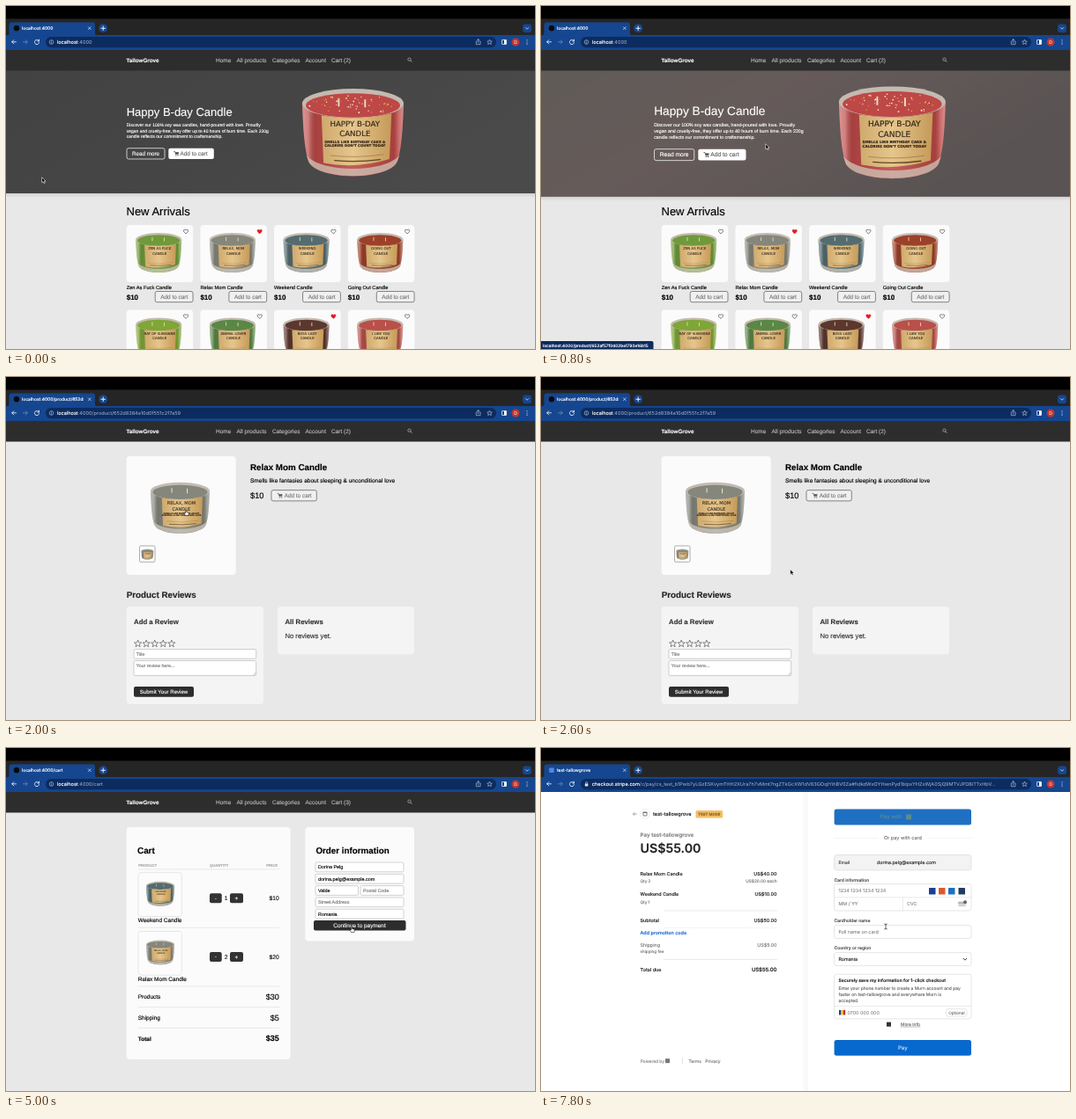
These frames come from a looping animation (600 px wide and 390 px high, 8000 ms). An HTML page:

```html
<!DOCTYPE html>
<html lang="en">
<head>
<meta charset="utf-8">
<title>Candle shop walkthrough</title>
<style>
@property --zoom { syntax: "<number>"; inherits: false; initial-value: 1; }
html, body { margin: 0; width: 100%; height: 100%; overflow: hidden; background: #000; }
svg { display: block; width: 100vw; height: 100vh; font-family: "Liberation Sans", Arial, sans-serif; text-rendering: geometricPrecision; }
text { stroke-width: .14px; }
.ui { font-family: Inter, Roboto, sans-serif; }
.label { font-family: "DejaVu Sans", Verdana, sans-serif; }
.b { font-weight: 700; }
.sb { font-weight: 600; }
.m { font-weight: 500; }
.mid { text-anchor: middle; }
.end { text-anchor: end; }
.line { fill: none; stroke-linecap: round; stroke-linejoin: round; }
/* Zooming through a property keeps the text sharp */
.hero { transform-origin: 300px 143px; transform: scale(var(--zoom)); animation: grow 8s infinite; }
.warm { animation: warm 8s infinite; }
.wallet { animation: wallet 8s infinite; }
.cursor { animation: move 8s infinite; }
@keyframes grow {
  0%, 2.5% { --zoom: 1; animation-timing-function: steps(3); }
  10%, 12.5% { --zoom: 1.052; animation-timing-function: steps(2); }
  17.5%, 100% { --zoom: 1; }
}
@keyframes warm {
  0%, 2.5% { opacity: 0; animation-timing-function: steps(3); }
  10%, 12.5% { opacity: 1; animation-timing-function: steps(2); }
  17.5%, 100% { opacity: 0; }
}
@keyframes wallet {
  0%, 90% { opacity: 0; animation-timing-function: steps(3); }
  97.5%, 100% { opacity: 1; }
}
</style>
</head>
<body>
<script>
const LOOP = 8000, FRAME = 200;
const pct = ms => ms / LOOP * 100 + '%';
let css = '', timers = 0;

// Drawing helpers
const text = (x, y, size, str, fill = '#000', cls = '') =>
  `<text x="${x}" y="${y}" font-size="${size}" fill="${fill}" stroke="${fill}" class="${cls}">${str}</text>`;
const rect = (x, y, w, h, fill, r = 0, stroke = 'none') =>
  `<rect x="${x}" y="${y}" width="${w}" height="${h}" rx="${r}" fill="${fill}" stroke="${stroke}" stroke-width=".7"/>`;
const dot = (x, y, r, fill) => `<circle cx="${x}" cy="${y}" r="${r}" fill="${fill}"/>`;
const line = (d, stroke, w = .7) => `<path class="line" d="${d}" stroke="${stroke}" stroke-width="${w}"/>`;
const rule = (x1, x2, y, stroke = '#dcdcdc') => line(`M${x1} ${y}H${x2}`, stroke, .6);
const at = (x, y, body) => `<g transform="translate(${x} ${y})">${body}</g>`;

// Shows a group only during the given [from, to] spans
function during(spans, body) {
  const name = 'on' + timers++;
  css += `@keyframes ${name}{0%{opacity:0}` +
    spans.map(([a, b]) => `${pct(a)}{opacity:1}${pct(b)}{opacity:0}`).join('') + '}';
  return `<g style="animation:${name} 8s step-end infinite">${body}</g>`;
}

function random(seed) {
  return () => (seed = (seed * 16807) % 2147483647) / 2147483647;
}

function candle(x, y, w, wax, lines, fine = [], extra = '') {
  const ink = '#33261a', body = 'M0 15C1 42 2 58 6 72C14 92 86 92 94 72C98 58 99 42 100 15Z';
  const rows = lines.map((s, i) => text(52, 38 + i * 9.8, 7.5, s, ink, 'label mid')).join('');
  const small = fine.map((s, i) => text(52, 54 + i * 4, 3.4, s, ink, 'label b mid')).join('');
  return `<g transform="translate(${x} ${y}) scale(${w / 100})">
    <path d="${body}" fill="${wax}"/><path d="${body}" fill="url(#glass)"/>
    <path d="M4 66C18 84 82 84 96 66L93 74C82 91 18 91 7 74Z" fill="#cfc6b8" opacity=".75"/>
    <ellipse cx="50" cy="15" rx="50" ry="14.5" fill="#c4bab0"/>
    <ellipse cx="50" cy="17" rx="46.5" ry="12" fill="${wax}"/>
    <path d="M36 18V10M62 19V11" stroke="#e9dfc4" stroke-width="1.6"/>${extra}
    <path d="M19 27Q54 33 88 25L86 70Q54 80 21 74Z" fill="url(#paper)"/>${rows}${small}
    ${line('M28 66.5Q54 69.5 80 65.5', '#8a693f', .5)}${line('M32 71.5Q54 73.5 77 70.5', '#5f4627', 1.1)}</g>`;
}

const cartIcon = (x, y, c) => at(x, y, line('M0 0H1.1L2 3.4H5', c, .7) +
  `<path d="M1.4.8H5.7L5 2.8H2Z" fill="${c}"/>` + dot(2.3, 4.6, .6, c) + dot(4.6, 4.6, .6, c));
const heart = (x, y, on) => at(x, y,
  `<path d="M0 2.5C-4.4-.4-2.3-3.4 0-1.4C2.3-3.4 4.4-.4 0 2.5Z" fill="${on ? '#e01b24' : 'none'}" stroke="${on ? '#e01b24' : '#222'}" stroke-width=".6"/>`);
function star(x, y) {
  const pts = Array.from({ length: 10 }, (_, i) => {
    const r = i % 2 ? 1.8 : 4.3, a = i * Math.PI / 5;
    return (x + r * Math.sin(a)).toFixed(2) + ',' + (y - r * Math.cos(a)).toFixed(2);
  });
  return `<polygon points="${pts.join(' ')}" fill="none" stroke="#444" stroke-width=".6"/>`;
}

// Shop pages
function shopNav() {
  const links = [[238, 'Home'], [261.5, 'All products'], [302, 'Categories'], [339.5, 'Account']];
  const count = n => text(369, 64, 6.5, `Cart (${n})`, '#b9b9b9');
  return rect(0, 50, 600, 23.5, '#2d2d2d') + text(136.5, 64, 6.25, 'TallowGrove', '#fff', 'b') +
    links.map(([x, s]) => text(x, 64, 6.5, s, '#b9b9b9')).join('') +
    during([[0, 3200]], count(2)) + during([[3200, LOOP]], count(3)) +
    `<circle cx="457.5" cy="60.7" r="1.7" fill="none" stroke="#ccc" stroke-width=".6"/>` +
    line('M458.8 62L460.2 63.4', '#ccc');
}

function hero() {
  const rnd = random(77), colors = ['#f4e3a1', '#f2b8b5', '#fff4d6', '#d9a441'];
  let bits = '';
  for (let i = 0; i < 55; i++) {
    const a = rnd() * 6.28, r = Math.sqrt(rnd());
    bits += dot((50 + 43 * r * Math.cos(a)).toFixed(1), (17 + 10.5 * r * Math.sin(a)).toFixed(1), .4 + rnd() * .4, colors[i % 4]);
  }
  const copy = ['Discover our 100% soy wax candles, hand-poured with love. Proudly',
    'vegan and cruelty-free, they offer up to 40 hours of burn time. Each 220g',
    'candle reflects our commitment to craftsmanship.'];
  return `<g class="hero">` + rect(0, 213, 600, 5, 'url(#shade)') + rect(0, 73, 600, 140, 'url(#dark)') +
    `<g class="warm">${rect(0, 73, 600, 140, 'url(#rosy)')}</g>` +
    text(136.7, 124.6, 13, 'Happy B-day Candle', '#fff') +
    copy.map((s, i) => text(136.7, 137 + i * 6.6, 5, s, '#fff')).join('') +
    rect(137, 161.7, 43, 12.3, 'none', 2, '#fff') + text(158.5, 170, 6.3, 'Read more', '#fff', 'mid') +
    rect(184.3, 161.7, 51.5, 12.3, '#fff', 2) + cartIcon(190.5, 165.4, '#444') + text(197.5, 170, 6.4, 'Add to cart', '#666') +
    candle(336, 93.5, 115, '#bd4846', ['HAPPY B-DAY', 'CANDLE'],
      ['SMELLS LIKE BIRTHDAY CAKE &amp;', "CALORIES DON'T COUNT TODAY"], bits) + '</g>';
}

const goods = [
  ['Zen As Fuck Candle', '#6f9a3a', ['ZEN AS FUCK', 'CANDLE']],
  ['Relax Mom Candle', '#85867c', ['RELAX, MOM', 'CANDLE'], 1],
  ['Weekend Candle', '#546c70', ['WEEKEND', 'CANDLE']],
  ['Going Out Candle', '#9c4029', ['GOING OUT', 'CANDLE']],
  ['Ray Of Sunshine Candle', '#7fa636', ['RAY OF SUNSHINE', 'CANDLE']],
  ['Animal Lover Candle', '#5a8746', ['ANIMAL LOVER', 'CANDLE']],
  ['Boss Lady Candle', '#5c372e', ['BOSS LADY', 'CANDLE'], 1],
  ['I Like You Candle', '#b9504a', ['I LIKE YOU', 'CANDLE']]
];
const RELAX = goods[1], WEEKEND = goods[2];

function goodsCard([name, wax, lines, liked], i) {
  return at(136.7 + i % 4 * 83.7, 249 + (i >> 2) * 96.5,
    rect(0, 0, 75.5, 65, '#fbfbfb', 4) + candle(10.5, 8.7, 52, wax, lines) + heart(67.3, 7.3, liked) +
    text(0, 73.3, 5.7, name) + text(0, 85, 8, '$10', '#000', 'b') +
    rect(32.5, 75.5, 42.8, 12.2, '#f0f0f0', 2, '#555') + text(54, 84, 6.4, 'Add to cart', '#777', 'mid'));
}

const home = () => rect(0, 50, 600, 340, '#e8e8e8') + hero() +
  text(136.5, 238, 13, 'New Arrivals') + goods.map(goodsCard).join('');

function product() {
  const fine = ['SMELLS LIKE FANTASIES ABOUT', 'SLEEPING &amp; UNCONDITIONAL LOVE'];
  return rect(0, 50, 600, 340, '#e8e8e8') + rect(136.7, 90, 124, 135, '#fbfbfb', 4) +
    candle(164, 119.5, 67, RELAX[1], RELAX[2], fine) +
    rect(151.5, 192, 17.5, 18.3, '#fff', 1.5, '#888') + candle(153.3, 195.5, 14, RELAX[1], RELAX[2]) +
    text(277, 105.5, 9.8, 'Relax Mom Candle', '#000', 'b') +
    text(277, 120.2, 6.55, 'Smells like fantasies about sleeping &amp; unconditional love') +
    text(277, 138, 9.3, '$10') + rect(301, 128.7, 51.3, 12.2, '#f0f0f0', 2, '#555') +
    cartIcon(308, 132.4, '#555') + text(315.7, 137, 6.4, 'Add to cart', '#777') +
    text(136.7, 250.5, 9.8, 'Product Reviews', '#222', 'b') +
    rect(136.7, 261, 155.3, 111, '#f4f4f4', 4) + text(145, 280.7, 7.8, 'Add a Review', '#333', 'b') +
    [0, 1, 2, 3, 4].map(i => star(149.6 + i * 9.55, 303.3)).join('') +
    rect(145, 309.6, 138.7, 10.6, '#fff', 1.5, '#bbb') + text(147.7, 317, 5.2, 'Title', '#777') +
    rect(145, 322.6, 138.7, 17, '#fff', 1.5, '#bbb') + text(147.7, 330, 5.25, 'Your review here...', '#777') +
    line('M280.5 338.7L283 336.2M282 338.8L283 337.8', '#888', .4) +
    rect(145, 352, 68, 11.7, '#2d2d2d', 2) + text(179, 360, 6.1, 'Submit Your Review', '#fff', 'mid') +
    rect(308, 261, 155, 54.3, '#f4f4f4', 4) + text(316.4, 280.7, 7.8, 'All Reviews', '#333', 'b') +
    text(316.4, 297.3, 7.7, 'No reviews yet.', '#333');
}

function cartRow([name, wax, lines], y, count, price) {
  return at(0, y, rect(150, 0, 49.3, 49.8, '#fcfcfc', 3, '#dedede') + candle(159, 10, 32, wax, lines) +
    text(149.7, 56.3, 6.5, name) + rect(231, 23.5, 13.7, 11, '#333', 2) + text(237.8, 31, 6.5, '-', '#fff', 'mid') +
    text(249.5, 31.3, 6.7, count, '#111', 'mid') + rect(254, 23.5, 15, 11, '#333', 2) +
    text(261.5, 31.3, 6.5, '+', '#fff', 'mid') + text(309.7, 31.3, 6.7, price, '#111', 'end'));
}

function cart() {
  const heads = [[150.3, 'PRODUCT'], [231, 'QUANTITY'], [295.3, 'PRICE']];
  const sums = [[285, 'Products', '$30', ''], [309, 'Shipping', '$5', ''], [332.6, 'Total', '$35', 'b ']];
  const fields = [[351, 130, 100, 'Dorina Pelg', 1], [351, 143.3, 100, 'dorina.pelg@example.com', 1],
    [351, 156.6, 48.5, 'Valde', 1], [402, 156.6, 49, 'Postal Code', 0],
    [351, 169.9, 100, 'Street Address', 0], [351, 183.2, 100, 'Romania', 1]];
  const pay = (x, y, w, h, s) => rect(x, y, w, h, '#2d2d2d', 2) + text(401, 204, s, 'Continue to payment', '#fff', 'mid');
  return rect(0, 50, 600, 340, '#e8e8e8') + rect(136.7, 90, 186, 264, '#fbfbfb', 4) +
    text(149, 119.5, 9.9, 'Cart', '#000', 'b') +
    heads.map(([x, s]) => text(x, 135, 4.2, s, '#aaa', 'b')).join('') +
    [138, 204.3, 271, 294.6, 318.3].map(y => rule(150, 309.7, y)).join('') +
    cartRow(WEEKEND, 141.7, 1, '$10') + cartRow(RELAX, 208.4, 2, '$20') +
    sums.map(([y, s, p, c]) => text(149.7, y, 6.5, s, '#000', c) + text(309.7, y + .8, 9, p, '#000', c + 'end')).join('') +
    rect(339.3, 90, 123.7, 129.5, '#fbfbfb', 4) + text(351.4, 119.5, 9.8, 'Order information', '#000', 'b') +
    fields.map(([x, y, w, s, on]) => rect(x, y, w, 10.8, '#fff', 1.5, '#bdbdbd') + text(x + 3, y + 7.4, 5.4, s, on ? '#000' : '#777')).join('') +
    during([[3600, 4600]], pay(351, 196.5, 100, 10.8, 6.2)) + during([[4600, 6200]], pay(349, 196, 104.5, 11.5, 6.45));
}

// Payment pages
const split = () => rect(0, 50, 600, 340, '#fff') + rect(295, 50, 8, 340, 'url(#fold)');
const powered = y => text(112.7, y, 4.9, 'Powered by', '#888') + rect(141, y - 4.4, 5, 5, '#777');
const backArrow = (x, y, c) => line(`M${x + 4} ${y}H${x}M${x + 1.6} ${y - 1.6}L${x} ${y}L${x + 1.6} ${y + 1.6}`, c, .6);

function skeleton() {
  const bars = [[113, 143, 34, 7, 3.5], [113, 155.5, 50, 10, 4.5], [113, 179, 17, 17, 3], [135, 179, 113.5, 4.6, 1],
    [135, 190.8, 113.5, 4.6, 1], [113, 205.5, 17, 17, 3], [135, 205.7, 113.5, 4.6, 1], [135, 217.7, 113.5, 4.6, 1]];
  const blocks = [[118.5, 10.5, 64], [145, 15.5, 154], [176, 30, 154], [222, 14.5, 154], [252, 30, 154], [294.5, 17.3, 154]];
  return `<g class="ui">` + split() + rect(0, 50, 600, 340, '#fafafa88') + backArrow(105, 124, '#aaa') + dot(119, 124, 5.6, '#ededed') +
    bars.map(([x, y, w, h, r]) => rect(x, y, w, h, '#ededed', r)).join('') +
    blocks.map(([y, h, w], i) => rect(338.3, y, w, h, 'url(#bone)', i ? 1.5 : 5)).join('') + powered(322) + '</g>';
}

function checkout() {
  const L = 112.6, R = 267.5, G = '#777', D = '#222';
  const row = (y, s, p, c = D, w = 'm ') => text(L, y, 5.4, s, c, w) + text(R, y, 5.4, p, c, w + 'end');
  const left = backArrow(104.5, 75, '#777') + `<circle cx="118" cy="75" r="5.3" fill="#fff" stroke="#e4e4e4" stroke-width=".7"/>` +
    rect(116, 73.2, 4, 3.8, '#fff', .5, '#444') + line('M115.8 73.2H120.2', '#444') +
    text(127, 77, 5.6, 'test-tallowgrove', D, 'm') + rect(175.5, 71, 30.7, 8.4, '#f2bf66', 1.5) +
    text(190.9, 76.8, 4.3, 'TEST MODE', '#8a5a18', 'sb mid') + text(L, 100.5, 6.2, 'Pay test-tallowgrove', G, 'm') +
    text(L, 118.6, 14.2, 'US$55.00', D, 'sb') + row(144.5, 'Relax Mom Candle', 'US$40.00') +
    text(L, 153, 4.6, 'Qty 2', G) + text(R, 153, 4.8, 'US$20.00 each', G, 'end') +
    row(168.4, 'Weekend Candle', 'US$10.00') + text(L, 177, 4.6, 'Qty 1', G) + rule(139.5, R, 185) +
    row(197.8, 'Subtotal', 'US$50.00') + rule(139.5, R, 204.5, '#eee') +
    text(L, 211.6, 5.4, 'Add promotion code', '#0a5bd0', 'm') + row(225.6, 'Shipping', 'US$5.00', G, '') +
    text(L, 232.6, 4.6, 'shipping fee', G) + rule(139.5, R, 240.5) +
    text(L, 253.6, 5.4, 'Total due', D, 'm') + text(R, 253.6, 5.9, 'US$55.00', D, 'sb end') +
    powered(357.6) + line('M160.5 352.5V359', '#ccc', .6) + text(167.5, 357.6, 4.9, 'Terms', G) + text(186.3, 357.6, 4.9, 'Privacy', G);

  const X = 337.5, H = '#888', E = '#dcdcdc';
  const box = (y, h, fill = '#fff') => rect(332.6, y, 155.4, h, fill, 2.5, E);
  const label = (y, s) => text(332.6, y, 4.95, s, '#444', 'm');
  const marks = [[440, '#1d3f94'], [451, '#db5a2b'], [462, '#1b6fc5'], [473.5, '#243b5e']];
  const about = ['Enter your phone number to create a Murn account and pay',
    'faster on test-tallowgrove and everywhere Murn is', 'accepted.'];
  const right = `<g class="wallet">` + rect(332.6, 69.5, 155.4, 18, '#1f6fc2', 2.5) +
    text(385, 80.3, 6, 'Pay with', '#5d8a8c', 'm') + rect(414, 75.5, 6, 6, '#5d8a8c') + '</g>' +
    rule(332.6, 382, 102.5, '#eee') + rule(439, 488, 102.5, '#eee') + text(410.5, 104.4, 5.5, 'Or pay with card', '#777', 'mid') +
    box(121.6, 17.3, '#f3f3f3') + text(X, 132.2, 5, 'Email', '#555', 'm') + text(381, 132.2, 5.3, 'dorina.pelg@example.com', D) +
    label(151.5, 'Card information') + box(154.6, 30.4) + rule(332.6, 488, 169.9, E) + line('M410.3 170V185', E, .6) +
    text(X, 164.3, 5.4, '1234 1234 1234 1234', H) + text(X, 179.4, 5.4, 'MM / YY', H) + text(415, 179.4, 5.4, 'CVC', H) +
    marks.map(([x, c]) => rect(x, 159, 7.5, 7.5, c, .6)).join('') +
    rect(473.3, 174.5, 8.5, 5.8, '#d4d4d4', .8) + rule(473.3, 481.8, 176, '#777') + dot(481, 175.3, 2, '#666') +
    label(197.7, 'Cardholder name') + box(201.5, 15) + text(X, 211, 5.4, 'Full name on card', H) +
    label(229, 'Country or region') + box(232.6, 15) + text(X, 242.1, 5.3, 'Romania', D) + line('M479 239.3L480.9 241.2L482.8 239.3', '#222', .9) +
    box(257.2, 50.7) + text(X, 266.3, 5.05, 'Securely save my information for 1-click checkout', D, 'sb') +
    about.map((s, i) => text(X, 274.5 + i * 7.2, 4.9, s, '#666')).join('') + rule(332.6, 488, 293.6, E) +
    rect(338, 298, 2.4, 5.5, '#223b85') + rect(340.4, 298, 2.4, 5.5, '#f0c52e') + rect(342.8, 298, 2.4, 5.5, '#c9302c') +
    text(347.4, 303, 5.4, '0700 000 000', H) + rect(459.7, 296.7, 23.3, 8.3, '#fff', 1.5, E) + text(471.4, 302.6, 4.7, 'Optional', '#777', 'mid') +
    rect(392, 311.7, 5, 5, '#333') + text(408, 316, 4.9, 'More info', '#666') + rule(408, 430, 317, '#888') +
    rect(332.6, 332, 155.4, 17.8, '#0768ce', 2.5) + text(410.3, 343.2, 6, 'Pay', '#bfdaf5', 'm mid');
  return `<g class="ui">${split()}${left}${right}</g>`;
}

// Browser frame
function browser() {
  const tab = (from, to, s, icon) => during([[from, to]], icon + text(18, 27.3, 4.9, s, '#fff', 'm'));
  const url = (from, to, host, path) => during([[from, to]],
    text(57.8, 43.1, 5.6, `${host}<tspan fill="#a5b9d8" stroke="none">${path}</tspan>`, '#fff'));
  const shopIcon = dot(12, 25.3, 3.2, '#0a0a0a');
  const ring = `<circle cx="12" cy="25.3" r="2.6" fill="none" stroke="#8fa9d2" stroke-width=".8" stroke-dasharray="12 5"/>`;
  const item = 'localhost:4000/product/652d8384';
  const payPath = '/c/pay/cs_test_b1Pwb7yLGzESKvymTHH2XUra7h7vMmt7ngZTkGcXW1dV83GOqtYihBV0Za#fidkdWxOYHwnPyd1blpxYHZxWjA0SjQ9MTVJPDBiTTxHbV...';
  const reload = line('M37.2 39.6A2.6 2.6 0 1 0 37.6 41.6M37.5 38.2V40H35.7', '#fff', .8);
  const stop = line('M33 38.8L37 42.8M37 38.8L33 42.8', '#fff', .9);
  const info = `<circle cx="51.5" cy="41" r="2.3" fill="none" stroke="#c5d3ea" stroke-width=".6"/>` + line('M51.5 41V42.2M51.5 39.8V39.9', '#c5d3ea', .6);
  const lock = rect(49.8, 40.5, 3.6, 2.9, '#d5e0f2', .4) + line('M50.5 40.5V39.7A1.1 1.1 0 0 1 52.7 39.7V40.5', '#d5e0f2', .6);
  return `<g class="ui">` + rect(0, 0, 600, 14.5, '#000') + rect(0, 14.5, 600, 19, '#252525') + rect(0, 33, 600, 17, '#15468f') +
    `<path d="M1 33.5Q3.5 33.5 3.5 30.5V21.5Q3.5 18.5 6.5 18.5H98Q101 18.5 101 21.5V30.5Q101 33.5 103.5 33.5Z" fill="#15468f"/>` +
    `<clipPath id="tabText"><path d="M0 18H88V33H0Z"/></clipPath><g clip-path="url(#tabText)">` +
    tab(0, 1600, 'localhost:4000', shopIcon) + tab(1600, 3600, item, shopIcon) +
    tab(3600, 5200, 'localhost:4000/cart', shopIcon) + tab(5200, 6200, 'localhost:4000/cart', ring) +
    tab(6200, 6800, 'Quovel Checkout', ring) + tab(6800, LOOP, 'test-tallowgrove', rect(9.2, 22.5, 5.6, 5.6, '#4f86e8', .8)) + '</g>' +
    line('M93.3 23.8L96.3 26.8M96.3 23.8L93.3 26.8', '#dfe8f7', .7) + dot(110.2, 25.3, 5, '#15468f') +
    line('M107.9 25.3H112.5M110.2 23V27.6', '#fff', .9) +
    rect(586, 20.5, 10, 9.8, '#15468f', 3) + line('M589.3 24.6L591 26.3L592.7 24.6', '#dfe8f7', .8) +
    line('M11.5 40.8H6.8M8.8 38.7L6.7 40.8L8.8 42.9', '#fff', .8) + line('M19.5 40.8H24.2M22.2 38.7L24.3 40.8L22.2 42.9', '#6d8dbf', .8) +
    during([[0, 5200], [7400, LOOP]], reload) + during([[5200, 7400]], stop) +
    rect(45, 35, 511, 12.2, '#0c2b5f', 6.1) + during([[0, 6200]], info) + during([[6200, LOOP]], lock) +
    url(0, 1600, 'localhost', ':4000') + url(1600, 3600, 'localhost', ':4000/product/652d8384e10d0f551c2f7a59') +
    url(3600, 6200, 'localhost', ':4000/cart') + url(6200, LOOP, 'checkout.stripe.com', payPath) +
    rect(526, 36, 16, 10, '#0c2b5f') +
    line('M534 40H533.3V43.7H538V40H537.3M535.65 42V37.8M534.4 39L535.65 37.7L536.9 39', '#c5d3ea', .6) +
    `<path transform="translate(548.5 41)" d="M0-2.8L.8-.9 2.8-.8 1.3.6 1.8 2.6 0 1.5-1.8 2.6-1.3.6-2.8-.8-.8-.9Z" fill="none" stroke="#c5d3ea" stroke-width=".6"/>` +
    rect(562.5, 38.5, 5, 5, 'none', .5, '#fff') + rect(565, 38.5, 2.5, 5, '#fff') +
    dot(578, 41, 4.5, '#c0362f') + text(578, 43, 5, 'D', '#f5d5d2', 'mid') +
    [38.8, 41, 43.2].map(y => dot(591, y, .6, '#dfe8f7')).join('') + '</g>';
}

function statusBar() {
  const note = (from, to, w, s) => during([[from, to]],
    `<g class="ui">${rect(-3, 381, w + 3, 12, '#0c2b5f', 2)}${text(2, 387.6, 4.75, s, '#fff', 'm')}</g>`);
  return note(600, 1200, 127.5, 'localhost:4000/product/652af57f0d02be1793e16b15') +
    note(1400, 1600, 127.5, 'localhost:4000/product/652d8384e10d0f551c2f7a59') +
    note(3400, 3600, 52, 'localhost:4000/cart') + note(5200, 6800, 200, 'Waiting for localhost...') +
    note(6800, 7400, 200, 'Waiting for checkout.stripe.com...');
}

function cursor() {
  const path = [[0, 41, 195], [800, 255, 157], [1400, 258, 285], [2000, 204, 151], [2600, 283, 219],
    [3000, 327, 135], [3400, 380, 62], [4800, 392, 203], [6400, 392, 203], [7800, 391, 203], [LOOP, 391, 203]];
  css += '@keyframes move{' + path.map(([ms, x, y], i) => {
    const steps = i + 1 < path.length ? (path[i + 1][0] - ms) / FRAME : 1;
    return `${pct(ms)}{transform:translate(${x}px,${y}px);animation-timing-function:steps(${steps})}`;
  }).join('') + '}';
  const arrow = `<path d="M-.3-.2V5.7L1.1 4.5 2.1 6.6 3.2 6.1 2.3 4.1H4.1Z" fill="#000" stroke="#fff" stroke-width=".6"/>`;
  const hand = `<path d="M-.6.6Q0-.4.6.6V2.6L3 3.2Q3.6 3.5 3.3 4.6L2.8 6.6H-.5L-2.2 4.1Q-2 3.3-.6 4.1Z" fill="#fff" stroke="#000" stroke-width=".55"/>`;
  const beam = line('M-1.3-3Q0-3 0-2Q0-3 1.3-3M0-2V2M-1.3 3Q0 3 0 2Q0 3 1.3 3', '#222', .7);
  return `<g class="cursor">` +
    during([[0, 1400], [1600, 1800], [2400, 2800], [3200, 3400], [3600, 4600], [6200, 6800]], arrow) +
    during([[1400, 1600], [1800, 2400], [2800, 3200], [3400, 3600], [4600, 6200]], hand) +
    during([[6800, LOOP]], beam) + '</g>';
}

const gradient = (id, stops, box = 'x2="1"') => `<linearGradient id="${id}" ${box}>` +
  stops.map(([o, c, a = 1]) => `<stop offset="${o}" stop-color="${c}" stop-opacity="${a}"/>`).join('') + '</linearGradient>';
const defs = '<defs>' +
  gradient('dark', [[0, '#424242'], [.5, '#454545'], [1, '#4a4a4a']], 'x2="1" y2=".4"') +
  gradient('rosy', [[0, '#605c58'], [.45, '#665b5a'], [1, '#595353']], 'x2="1" y2=".4"') +
  gradient('shade', [[0, '#000', .1], [1, '#000', 0]], 'x2="0" y2="1"') +
  gradient('glass', [[0, '#fff', .42], [.06, '#fff', .3], [.13, '#000', .12], [.5, '#fff', .12], [.9, '#000', .12], [.95, '#fff', .2], [1, '#fff', .4]]) +
  gradient('paper', [[0, '#cfa96c'], [.45, '#e6c68c'], [1, '#c59a58']]) +
  gradient('fold', [[0, '#000', 0], [.85, '#000', .035], [1, '#000', 0]]) +
  gradient('bone', [[0, '#f7f7f7'], [.37, '#f1f1f1'], [1, '#f5f5f5']]) + '</defs>';

const scene = defs + during([[0, 1600]], home()) + during([[1600, 3600]], product()) +
  during([[3600, 6200]], cart()) + during([[0, 6200]], shopNav()) +
  during([[6200, 6800]], skeleton()) + during([[6800, LOOP]], checkout()) +
  browser() + statusBar() + cursor();

document.head.insertAdjacentHTML('beforeend', `<style>${css}</style>`);
document.body.insertAdjacentHTML('beforeend', `<svg viewBox="0 0 600 390">${scene}</svg>`);
</script>
</body>
</html>
```
